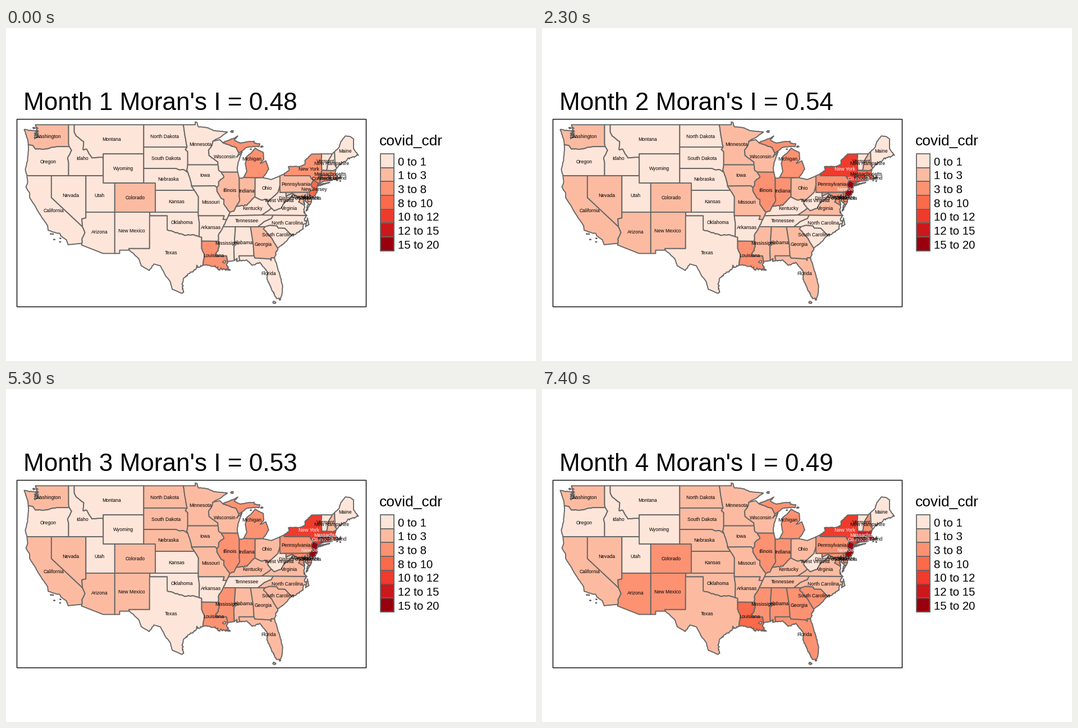
A matplotlib script for the animation above (8 s loop, 944 by 593 pixels).

```python
from math import dist

import numpy as np
import matplotlib.pyplot as plt
from matplotlib.animation import FuncAnimation
from matplotlib.patches import Polygon, Rectangle

W, H, DPI = 944, 593, 100
PX = 72 / DPI
GRAY = "#666666"
REDS = ["#FEE5D9", "#FCBBA1", "#FC9272", "#FB6A4A", "#EF3B2C", "#CB181D", "#99000D"]
BREAKS = [0, 1, 3, 8, 10, 12, 15, 20]
INDEX = [0.48, 0.54, 0.53, 0.49]
rng = np.random.default_rng(4)

fig = plt.figure(figsize=(W / DPI, H / DPI), dpi=DPI, facecolor="white")
ax = fig.add_axes([0, 0, 1, 1])
ax.set_xlim(0, W)
ax.set_ylim(H, 0)
ax.axis("off")


def project(pts):
    lon, lat = np.array(pts).T
    return np.column_stack([245.3 + (lon + 104.05) * 10.31, 172.3 + (49 - lat) * 12.97])


def rough(*pts, amp=0.02, step=0.2):
    """Wind between key points like a river or a shore."""
    out = []
    for a, b in zip(pts, pts[1:]):
        a, b = np.array(a), np.array(b)
        n = max(1, int(dist(a, b) / step))
        out.append(tuple(a))
        out += [tuple(a + (b - a) * k / n + rng.normal(0, amp, 2)) for k in range(1, n)]
    return out + [pts[-1]]


def shore(*pts, amp=0.055):
    return rough(*pts, amp=amp, step=0.12)


def islet(lon, lat, size=0.1):
    t = np.arange(7) * 2 * np.pi / 7
    r = size * rng.uniform(0.6, 1.2, 7)
    return list(zip(lon + r * np.cos(t), lat + r * np.sin(t) / 2))


def box(w, s, e, n):
    return [(w, n), (e, n), (e, s), (w, s)]


def ring(*parts):
    """Chain points and borders, turning each border to meet the one before."""
    arcs = [[p] if isinstance(p, tuple) else p for p in parts]
    ends = arcs[1][0], arcs[1][-1]
    gap = [min(dist(p, e) for e in ends) for p in (arcs[0][0], arcs[0][-1])]
    out = list(arcs[0] if gap[1] <= gap[0] else arcs[0][::-1])
    for arc in arcs[1:]:
        near_end = dist(out[-1], arc[-1]) < dist(out[-1], arc[0])
        out += arc[::-1] if near_end else arc
    return out


def centroid(polys):
    area, total = 0, np.zeros(2)
    for p in polys:
        q = np.roll(p, -1, axis=0)
        cross = p[:, 0] * q[:, 1] - q[:, 0] * p[:, 1]
        sign = np.sign(cross.sum())
        area += sign * cross.sum() / 2
        total += sign * ((p + q) * cross[:, None]).sum(axis=0) / 6
    return total / area


def text(x, y, s, size, ha="left", **kw):
    return ax.text(x, y, s, fontsize=size * PX, ha=ha, va="baseline",
                   family="Liberation Sans", **kw)


states = []


def state(name, first, last, *rings, growth=0.5):
    """Add a state whose rate rises from first to last over the months."""
    polys = [project(r) for r in rings]
    shapes = [Polygon(p, ec=GRAY, lw=1.9 * PX, joinstyle="round", snap=False, zorder=2)
              for p in polys]
    for shape in shapes:
        ax.add_patch(shape)
    x, y = centroid(polys)
    label = text(x, y + 3.1, name, 8.7, "center", zorder=5)
    rates = first + (last - first) * (np.arange(4) / 3) ** growth
    states.append((shapes, label, np.digitize(rates, BREAKS[1:-1])))


# Western borders
columbia = rough((-124, 46.25), (-123.2, 46.15), (-122.75, 45.65), (-121.2, 45.65),
                 (-119.6, 45.92), (-118.98, 46)) + [(-116.92, 46)]
snake = rough((-116.92, 46), (-116.5, 45.5), (-117.2, 44.4), (-117.03, 43.83)) + [(-117.03, 42)]
bitterroot = [(-116.05, 49)] + rough((-116.05, 48), (-115.7, 47.45), (-114.4, 46.65),
                                     (-114.5, 45.56), (-113.9, 45.65), (-113, 44.45),
                                     (-111.5, 44.54), (-111.05, 44.48))
colorado_n = [(-114.04, 36.2), (-114.74, 36.08), (-114.63, 35)]
colorado_s = rough((-114.63, 35), (-114.2, 34.2), (-114.7, 33.4), (-114.72, 32.72))

# Plains borders
red_n = rough((-97.23, 49), (-96.8, 46.9), (-96.56, 45.94))
big_stone = [(-96.56, 45.94), (-96.85, 45.6), (-96.45, 45.3), (-96.45, 43.5)]
sioux = rough((-96.45, 43.5), (-96.6, 42.8), (-96.45, 42.49))
missouri_w = rough((-98.5, 43), (-97.9, 42.8), (-97.2, 42.85), (-96.45, 42.49))
missouri_m = rough((-96.45, 42.49), (-95.9, 41.2), (-95.77, 40.58))
missouri_s = rough((-95.77, 40.58), (-95.3, 40))
missouri_k = rough((-95.3, 40), (-94.95, 39.6), (-94.6, 39.12)) + [(-94.62, 37)]
red_s = rough((-100, 34.56), (-98.1, 34.13), (-97, 33.8), (-95.5, 33.9), (-94.48, 33.64),
              amp=0.035)
sabine = [(-94.04, 33.02)] + rough((-94.04, 32), (-93.55, 31.1), (-93.72, 30.4), (-93.85, 29.7))

# Mississippi and Great Lakes borders
croix = rough((-92.1, 46.75), (-92.3, 46.1), (-92.85, 45.5), (-92.75, 44.75), (-91.25, 43.9),
              (-91.22, 43.5))
miss_wi = rough((-91.22, 43.5), (-91.1, 42.75), (-90.64, 42.5))
miss_ia = rough((-90.64, 42.5), (-90.2, 41.8), (-91.1, 41.2), (-91.1, 40.7), (-91.42, 40.38))
des_moines = [(-95.77, 40.58), (-91.73, 40.61), (-91.42, 40.38)]
miss_il = rough((-91.42, 40.38), (-91.4, 39.9), (-90.65, 38.9), (-90.2, 38.75), (-90.2, 38.1),
                (-89.5, 37.3), (-89.15, 36.98))
miss_ky = [(-89.15, 36.98), (-89.4, 36.5)]
miss_tn = [(-89.4, 36.5), (-89.7, 36)]
miss_tn2 = rough((-89.7, 36), (-90.3, 35))
miss_ar = rough((-90.3, 35), (-91.1, 33.9), (-91.15, 33), amp=0.04)
miss_la = rough((-91.15, 33), (-91, 32.3), (-91.6, 31), amp=0.04) + [
    (-89.73, 31), (-89.55, 30.18)]
bootheel = [(-94.62, 36.5), (-90.15, 36.5), (-90.37, 36), (-89.7, 36)]
menominee = rough((-90.4, 46.55), (-88.1, 45.9), (-87.6, 45.1))
wabash = [(-87.55, 41.7)] + rough((-87.53, 39.35), (-87.5, 38.5), (-88.05, 37.8))

# Ohio valley and southern borders
ohio_il = rough((-89.15, 36.98), (-88.45, 37.15), (-88.05, 37.8))
ohio_in = rough((-88.05, 37.8), (-86.2, 37.95), (-85.4, 38.7), (-84.82, 39.1), amp=0.04)
ohio_ky = rough((-84.82, 39.1), (-83.7, 38.65), (-82.9, 38.75), (-82.6, 38.42))
ohio_wv = rough((-82.6, 38.42), (-81.75, 39.05), (-80.85, 39.7), (-80.52, 40.64))
tug = rough((-82.6, 38.42), (-82.6, 38.15), (-81.97, 37.54))
cumberland = rough((-81.97, 37.54), (-82.7, 37.1), (-83.67, 36.6))
allegheny = rough((-81.97, 37.54), (-81.5, 37.2), (-80.3, 37.55), (-79.65, 38.55),
                  (-79.2, 38.5), (-78.35, 39.4), (-77.75, 39.3))
potomac_n = rough((-79.48, 39.72), (-79.48, 39.2), (-78.4, 39.6), (-77.75, 39.3))
potomac = rough((-77.75, 39.3), (-77.04, 38.8), (-77.3, 38.4), (-76.3, 37.95), amp=0.04)
smoky = rough((-81.68, 36.59), (-82, 36.1), (-83.1, 35.75), (-84.32, 34.99))
carolina = [(-78.55, 33.86), (-79.67, 34.8), (-80.8, 34.82), (-81.05, 35.12), (-82.3, 35.2),
            (-83.1, 35)]
savannah = rough((-83.1, 35), (-83.35, 34.7), (-81.95, 33.45), (-80.9, 32.03))
chatta = [(-85.6, 34.98)] + rough((-85.18, 32.85), (-85.05, 32), (-85, 31))
st_marys = [(-85, 31), (-84.86, 30.7), (-82.2, 30.57), (-82.05, 30.36), (-82, 30.75),
            (-81.45, 30.7)]
ms_al = [(-88.2, 35), (-88.47, 31.9), (-88.4, 30.35)]

# Northeastern borders
delaware_n = rough((-74.7, 41.36), (-75.15, 40.8), (-74.72, 40.15), (-75.42, 39.8))
delaware_w = rough((-75.35, 42), (-75.05, 41.6), (-74.7, 41.36))
champlain = rough((-73.35, 45), (-73.35, 43.7)) + [(-73.27, 42.75)]
connecticut = rough((-71.5, 45), (-72.1, 44.1), (-72.46, 42.73))
nh_me = [(-71.08, 45.3), (-70.98, 43.4), (-70.7, 43.07)]

# West
state("Washington", 1.1, 2,
      ring(columbia, (-117.03, 46.42), (-117.03, 49),
           rough((-122.75, 49), (-122.4, 48.2), (-122.4, 47.3), (-122.9, 47.1),
                 (-122.6, 47.9), (-122.75, 48.15), amp=0.1, step=0.08),
           rough((-122.75, 48.15), (-124.7, 48.35), (-124.3, 47.4), (-124.05, 46.7),
                 (-124, 46.25), amp=0.03)),
      islet(-122.5, 48.15, 0.2), islet(-123, 48.55, 0.2))
state("Oregon", 0.3, 0.9,
      ring(columbia, snake, rough((-124.21, 42), (-124.5, 42.8), (-124.1, 44.2),
                                  (-123.95, 45.9), (-124, 46.25))))
state("California", 0.5, 2,
      ring([(-120, 42), (-120, 39), (-114.63, 35)], colorado_s,
           rough((-117.12, 32.53), (-117.4, 33.2), (-118.4, 33.75), (-118.5, 34.03),
                 (-119.2, 34.15), (-120.55, 34.5), (-120.65, 35.15), (-121.9, 36.6),
                 (-122.45, 37.3), (-122.95, 38.05), (-123.75, 39), (-123.8, 39.7),
                 (-124.4, 40.43), (-124.1, 41.1), (-124.21, 42))),
      *[islet(*p) for p in [(-120.1, 34), (-119.75, 34), (-119.5, 33.25),
                            (-118.45, 33.4), (-118.5, 32.92)]])
state("Idaho", 0.3, 0.9,
      ring(bitterroot, (-111.05, 42), snake, (-117.03, 46.42), (-117.03, 49)))
state("Nevada", 0.5, 2, ring((-120, 42), (-114.04, 42), colorado_n, (-120, 39)))
state("Montana", 0.1, 0.3, ring(bitterroot, (-111.05, 45), (-104.05, 45), (-104.05, 49)))
state("Wyoming", 0.1, 0.4, box(-111.05, 41, -104.05, 45))
state("Utah", 0.2, 0.9,
      [(-111.05, 42), (-111.05, 41), (-109.05, 41), (-109.05, 37), (-114.04, 37), (-114.04, 42)])
state("Arizona", 0.5, 3.1,
      ring((-114.04, 37), (-109.05, 37), (-109.05, 31.33), (-111.07, 31.33), (-114.81, 32.5),
           colorado_s, colorado_n))
state("Colorado", 1.3, 3.1, box(-109.05, 37, -102.05, 41))
state("New Mexico", 0.5, 3.1,
      [(-109.05, 37), (-103, 37), (-103.04, 32), (-106.62, 32), (-106.53, 31.78),
       (-108.21, 31.78), (-108.21, 31.33), (-109.05, 31.33)])

# Plains
state("North Dakota", 0.2, 1.2, ring((-104.05, 49), red_n, (-104.05, 45.94)))
state("South Dakota", 0.2, 1.2,
      ring(big_stone, sioux, missouri_w, (-104.05, 43), (-104.05, 45.94)))
state("Nebraska", 0.2, 1.2,
      ring(missouri_w, missouri_m, missouri_s, (-102.05, 40), (-102.05, 41), (-104.05, 41),
           (-104.05, 43)))
state("Kansas", 0.2, 1.1, ring((-102.05, 40), missouri_k, (-102.05, 37)))
state("Oklahoma", 0.2, 1.1,
      ring((-103, 37), (-94.62, 37), (-94.62, 36.5), (-94.43, 35.4), red_s, (-100, 36.5),
           (-103, 36.5)))
state("Texas", 0.2, 1.1,
      ring((-103.04, 36.5), (-100, 36.5), red_s, (-94.04, 33.55), sabine,
           shore((-93.85, 29.7), (-94.7, 29.4), (-94.85, 29.7), (-95, 29.2), (-97.1, 28),
                 (-97.4, 27.2), (-97.15, 26), (-97.4, 25.85)),
           rough((-97.4, 25.85), (-99.1, 26.4), (-99.5, 27.5), (-100.3, 28.3),
                 (-101.2, 29.65), (-102.3, 29.88), (-103.1, 28.98), (-104.5, 29.65),
                 (-104.9, 30.6), (-106.53, 31.78)),
           (-106.62, 32), (-103.04, 32)))

# Midwest
state("Minnesota", 0.5, 2,
      ring((-97.23, 49), (-95.15, 49), (-95.15, 49.38), (-94.85, 49.32),
           rough((-94.65, 48.75), (-93, 48.6), (-92, 48.2), (-89.6, 48), (-90.8, 47.3),
                 (-92.1, 46.75)),
           croix, big_stone, red_n))
state("Iowa", 0.5, 2, ring(miss_wi, miss_ia, des_moines, missouri_m, sioux))
state("Missouri", 0.5, 2,
      ring(des_moines, miss_il, miss_ky, miss_tn, bootheel, missouri_k, missouri_s))
state("Arkansas", 0.2, 1.1,
      ring(bootheel, miss_tn2, miss_ar, (-94.04, 33.02), (-94.04, 33.55), (-94.48, 33.64),
           (-94.43, 35.4)))
state("Louisiana", 4, 8.2,
      ring(miss_la, shore((-89.55, 30.18), (-89.7, 29.65), (-89.1, 29.02), (-90.1, 29.15),
                          (-90.9, 29.1), (-91.8, 29.55), amp=0.09),
           rough((-92.2, 29.55), (-93.2, 29.78)), sabine))
ax.add_patch(Polygon(project(islet(-90.1, 30.2, 0.3)), fc="white", ec=GRAY, lw=1.9 * PX,
                     zorder=3))
state("Wisconsin", 0.5, 2,
      ring((-92.1, 46.75), (-90.9, 46.95), menominee,
           rough((-87.6, 45.1), (-88, 44.55), (-87.05, 45.28), (-87.7, 43.9), (-87.9, 43),
                 (-87.8, 42.49)), miss_wi, croix))
state("Illinois", 1.8, 5.5, ring((-87.8, 42.49), wabash, ohio_il, miss_il, miss_ia))
state("Indiana", 1.8, 5.5, ring(wabash, ohio_in, (-84.8, 41.76), (-86.8, 41.76), (-87.1, 41.65)))
state("Michigan", 4, 6.5,
      rough((-84.8, 41.73), (-86.8, 41.76), amp=0)
      + rough((-86.25, 42.6), (-86.5, 43.7), (-86.2, 44.7), (-85.5, 45.1), (-84.8, 45.77),
              (-83.4, 45.2), (-83.3, 44.3), (-83.9, 43.7), (-82.95, 44.05), (-82.45, 42.9),
              (-83.45, 41.73)),
      ring(menominee, rough((-90.4, 46.55), (-88.5, 47.15), (-87.8, 47.45), (-88.4, 46.9),
                            (-87.4, 46.5), (-86, 46.68), (-85, 46.75), (-84.95, 46.48),
                            (-84, 46.4), (-84.1, 46), (-85.9, 45.95), (-86.6, 45.7),
                            (-87.6, 45.1), amp=0.03)),
      islet(-88.8, 48.05, 0.3), islet(-85.55, 45.65), islet(-83.65, 46, 0.2))
state("Ohio", 0.5, 2,
      ring(ohio_ky, ohio_wv, rough((-80.52, 41.98), (-82, 41.48), (-83.45, 41.73)),
           (-84.8, 41.7)))

# South
state("Kentucky", 0.2, 1.2, ring(ohio_il, ohio_in, ohio_ky, tug, cumberland, (-89.4, 36.5)))
state("Tennessee", 0.2, 1.1,
      ring((-89.4, 36.5), (-83.67, 36.6), (-81.68, 36.59), smoky, (-90.3, 35), miss_tn2,
           miss_tn))
state("Mississippi", 0.5, 4,
      ring(ms_al, shore((-88.4, 30.35), (-89.55, 30.18), amp=0.03), miss_la, miss_ar))
state("Alabama", 0.5, 3.1,
      ring((-88.2, 35), chatta, (-87.6, 31),
           shore((-87.45, 30.35), (-88, 30.25), (-87.95, 30.65), (-88.4, 30.35), amp=0.03),
           ms_al))
state("Georgia", 1.1, 3.1,
      ring(savannah, shore((-80.9, 32.03), (-81.45, 30.7)), st_marys, chatta))
state("Florida", 0.5, 3.1,
      ring((-87.6, 31), st_marys, rough((-81.45, 30.7), (-80.55, 28.4), (-80.05, 26.8),
                                        (-80.2, 25.6), amp=0.025),
           shore((-80.4, 25.2), (-81.1, 25.13), (-82, 26.5), (-82.75, 27.8), (-82.65, 28.8),
                 (-84, 30.1), (-85.3, 29.7), (-86.2, 30.4), (-87.45, 30.35), amp=0.04)),
      islet(-80.55, 25, 0.15), islet(-81.5, 24.62, 0.3))
state("South Carolina", 0.3, 3.3,
      ring(carolina, savannah, shore((-80.9, 32.03), (-79.3, 33.1), (-78.55, 33.86), amp=0.04)),
      growth=1.5)
state("North Carolina", 0.2, 1.2,
      ring(smoky, (-83.1, 35), carolina,
           shore((-78.55, 33.86), (-77.95, 33.9), (-76.55, 34.68), (-76.5, 35.2), (-75.8, 35.6),
                 (-76.3, 36), (-75.87, 36.55))),
      shore((-75.75, 36.2), (-75.5, 35.3), (-76.1, 35), amp=0.02))
state("Virginia", 0.5, 2,
      ring(cumberland, allegheny, potomac,
           shore((-76.3, 37.95), (-76.4, 37.05), (-75.87, 36.55), amp=0.08), (-81.68, 36.59)),
      shore((-75.95, 37.15), (-75.8, 37.9), (-75.4, 38), (-75.95, 37.15), amp=0.04))
state("West Virginia", 0.2, 0.7, ring(ohio_wv, (-80.52, 39.72), potomac_n, allegheny, tug))

# Northeast
state("Pennsylvania", 1.8, 5.6,
      ring((-80.52, 41.98), (-79.76, 42.27), (-79.76, 42), delaware_w, delaware_n,
           (-75.79, 39.72), (-80.52, 39.72)))
state("New York", 7.9, 11.9,
      ring((-79.76, 42), rough((-79.76, 42.27), (-78.9, 42.8), (-79.05, 43.26), (-77, 43.28),
                               (-76.2, 43.55), (-76.2, 44.1), (-75, 44.98)),
           champlain, (-73.5, 42.05), (-73.65, 41), (-74.02, 40.7), (-73.9, 41), delaware_w),
      shore((-74, 40.6), (-71.9, 41.07), (-73.7, 40.85), (-74, 40.6), amp=0.03))
state("District of Columbia", 3.5, 8.2, islet(-77.03, 38.9, 0.08))
state("Maryland", 1.9, 5.5,
      ring(potomac_n, potomac, shore((-76.3, 37.95), (-76.5, 39.1), (-76.1, 39.4),
                                     (-76.2, 38.5), (-75.3, 38.03), amp=0.08),
           (-75.05, 38.45), (-75.7, 38.46), (-75.79, 39.72)))
state("Delaware", 1.5, 5.5,
      [(-75.79, 39.72), (-75.42, 39.8), (-75.5, 39.3), (-75.08, 38.8), (-75.05, 38.45),
       (-75.7, 38.46)])
state("New Jersey", 9.5, 19.5,
      ring(delaware_n, shore((-75.5, 39.5), (-74.9, 38.95), (-74.1, 39.75), (-74.1, 40.45),
                             amp=0.04), (-74.02, 40.7), (-73.9, 41)))
state("Vermont", 0.5, 0.9, ring(champlain, connecticut))
state("New Hampshire", 0.5, 3.1, ring(nh_me, (-70.85, 42.87), (-71.3, 42.7), connecticut))
state("Maine", 0.3, 0.9,
      ring(nh_me, rough((-71.08, 45.3), (-70.3, 45.9), (-70, 46.7), (-69.23, 47.46),
                        (-68.3, 47.35), (-67.8, 47.07)),
           rough((-67.8, 45.7), (-66.97, 44.8)),
           shore((-66.97, 44.8), (-68.8, 44.4), (-69.1, 44), (-70.2, 43.65), (-70.7, 43.07))))
state("Massachusetts", 5.3, 12.3,
      ring((-73.27, 42.75), (-71.3, 42.7),
           shore((-70.85, 42.87), (-71, 42.3), (-70.55, 41.8), (-70.05, 41.78), (-70.1, 42.05),
                 (-69.95, 41.7), (-71.13, 41.5), amp=0.03), (-71.38, 42.02), (-73.5, 42.05)),
      islet(-70.65, 41.38, 0.15), islet(-70.1, 41.28))
state("Connecticut", 6.5, 13.5,
      [(-73.5, 42.05), (-71.8, 42.02), (-71.85, 41.32), (-72.9, 41.25), (-73.65, 41)])
state("Rhode Island", 2.6, 9.4,
      [(-71.8, 42.02), (-71.38, 42.02), (-71.13, 41.5), (-71.4, 41.6), (-71.48, 41.37),
       (-71.85, 41.32)])

# Frame and legend
ax.add_patch(Rectangle((19, 161.6), 622.4, 334, fill=False, ec="black", lw=1.4 * PX))
text(664.5, 209, "covid_cdr", 26.4)
for k, color in enumerate(REDS):
    top = 224 + 24.65 * k
    ax.add_patch(Rectangle((667, top), 24.4, 24.65, fc=color, ec=GRAY, lw=1.8 * PX))
    text(697.5, top + 20.7, f"{BREAKS[k]} to {BREAKS[k + 1]}", 20.4)
title = text(30.8, 146, "", 44.15)


def update(i):
    month = (i + 5) // 6
    title.set_text(f"Month {month + 1} Moran's I = {INDEX[month]:.2f}")
    for shapes, label, levels in states:
        level = levels[month]
        for shape in shapes:
            shape.set_facecolor(REDS[level])
        label.set_color("white" if level >= 4 else "black")
    return []


anim = FuncAnimation(fig, update, frames=16, interval=500, repeat=True, repeat_delay=0)
plt.show()
```
